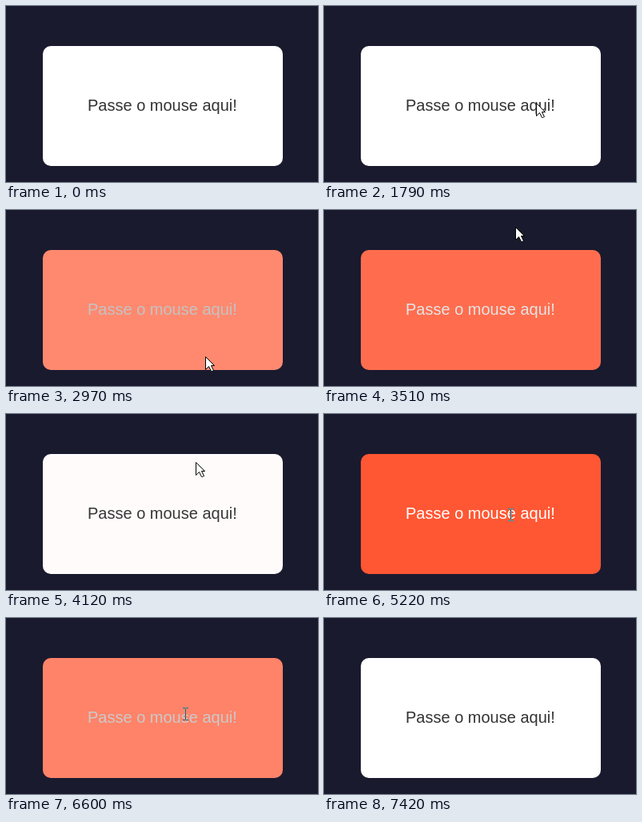
Recreate the animation shown at these times as an HTML page with a canvas. Size 390 by 220 pixels, loop 7.68 s.

```html
<!DOCTYPE html>
<html lang="pt-BR">
<head>
<meta charset="utf-8">
<title>Hover</title>
<style>
  html, body { margin: 0; width: 100%; height: 100%; overflow: hidden; background: #1a1a2e; }
  canvas { display: block; }
</style>
</head>
<body>
<canvas id="stage" width="390" height="220"></canvas>
<script>
const ctx = document.getElementById('stage').getContext('2d');
const LOOP = 7680, FADE = 300;
const WHITE = [255, 255, 255], ORANGE = [255, 87, 51], DARK = [51, 51, 51];
const CARD = { x: 46, y: 50, w: 300, h: 150, r: 10 };
const LABEL = { x: 102, y: 113, w: 187, h: 23 };

// Where the pointer rests or turns round
const turns = [
  { t: 1790, x: 265, y: 121 }, { t: 2620, x: 263, y: 124 },
  { t: 2740, x: 252, y: 210 }, { t: 3370, x: 242, y: 121 },
  { t: 3540, x: 239, y: 13 },  { t: 4040, x: 239, y: 13 },
  { t: 4222, x: 235, y: 126 }, { t: 5220, x: 233, y: 126 },
  { t: 5430, x: 239, y: 24 },  { t: 5640, x: 236, y: 100 },
  { t: 5850, x: 236, y: 100 }, { t: 6100, x: 238, y: 12 },
  { t: 6380, x: 235, y: 12 },  { t: 6600, x: 224, y: 120 },
  { t: 7000, x: 224, y: 122 }, { t: 7140, x: 226, y: 206 }
];

const lerp = (a, b, k) => a + (b - a) * k;
const smooth = k => k * k * (3 - 2 * k);
const mix = (a, b, k) => `rgb(${a.map((v, i) => Math.round(lerp(v, b[i], k)))})`;
const inside = (p, box) =>
  p && p.x >= box.x && p.x < box.x + box.w && p.y >= box.y && p.y < box.y + box.h;

// CSS "ease": cubic-bezier(.25, .1, .25, 1)
function ease(x) {
  if (x <= 0) return 0;
  if (x >= 1) return 1;
  const curve = (a, b, s) => 3 * a * s * (1 - s) ** 2 + 3 * b * s * s * (1 - s) + s ** 3;
  let lo = 0, hi = 1;
  for (let i = 0; i < 24; i++) {
    const mid = (lo + hi) / 2;
    if (curve(.25, .25, mid) < x) lo = mid; else hi = mid;
  }
  return curve(.1, 1, lo);
}

function pointerAt(t) {
  const i = turns.findIndex(p => p.t > t);
  if (i < 1) return null;
  const a = turns[i - 1], b = turns[i];
  const k = smooth((t - a.t) / (b.t - a.t));
  return { x: Math.round(lerp(a.x, b.x, k)), y: Math.round(lerp(a.y, b.y, k)) };
}

const fadeValue = (f, t) => lerp(f.from, f.to, ease((t - f.start) / f.span));

// One fade each time the pointer enters or leaves; interrupted fades turn back
function buildFades() {
  const fades = [{ start: 0, from: 0, to: 0, span: 1 }];
  for (let t = 0; t < LOOP; t += 2) {
    const last = fades[fades.length - 1];
    const to = inside(pointerAt(t), CARD) ? 1 : 0;
    if (to === last.to) continue;
    const from = fadeValue(last, t);
    fades.push({ start: t, from, to, span: FADE * Math.abs(to - from) });
  }
  return fades.reverse();
}
const fades = buildFades();
const hoverAt = t => fadeValue(fades.find(f => f.start <= t), t);

function drawCard(hover) {
  ctx.fillStyle = mix(WHITE, ORANGE, hover);
  ctx.beginPath();
  ctx.roundRect(CARD.x, CARD.y, CARD.w, CARD.h, CARD.r);
  ctx.fill();
  ctx.font = '20px Arial, "Liberation Sans", sans-serif';
  ctx.fillStyle = mix(DARK, WHITE, hover);
  ctx.fillText('Passe o mouse aqui!', LABEL.x, 131);
}

const arrow = new Path2D('M.5 .5 L11.5 11.5 H7.5 L10.5 17.5 L8.5 18.5 H7.5 L4.5 12.5 L.5 16.5 Z');

function drawArrow({ x, y }) {
  ctx.save();
  ctx.translate(x, y);
  ctx.fillStyle = '#fff';
  ctx.fill(arrow);
  ctx.strokeStyle = '#000';
  ctx.stroke(arrow);
  ctx.restore();
}

// The text cursor inverts what lies beneath it
function drawBeam({ x, y }) {
  ctx.save();
  ctx.globalCompositeOperation = 'difference';
  ctx.fillStyle = '#fff';
  for (const edge of [y - 8, y + 7]) {
    ctx.fillRect(x - 3, edge, 3, 1);
    ctx.fillRect(x + 1, edge, 3, 1);
  }
  ctx.fillRect(x, y - 7, 1, 14);
  ctx.restore();
}

function render(t) {
  const hover = hoverAt(t), pointer = pointerAt(t);
  ctx.fillStyle = '#1a1a2e';
  ctx.fillRect(0, 0, 390, 220);
  drawCard(hover);
  if (!pointer) return;
  const onText = hover > .1 && inside(pointer, LABEL);
  (onText ? drawBeam : drawArrow)(pointer);
}

const begin = performance.now();
function loop() {
  render((performance.now() - begin) % LOOP);
  requestAnimationFrame(loop);
}
loop();
</script>
</body>
</html>
```
